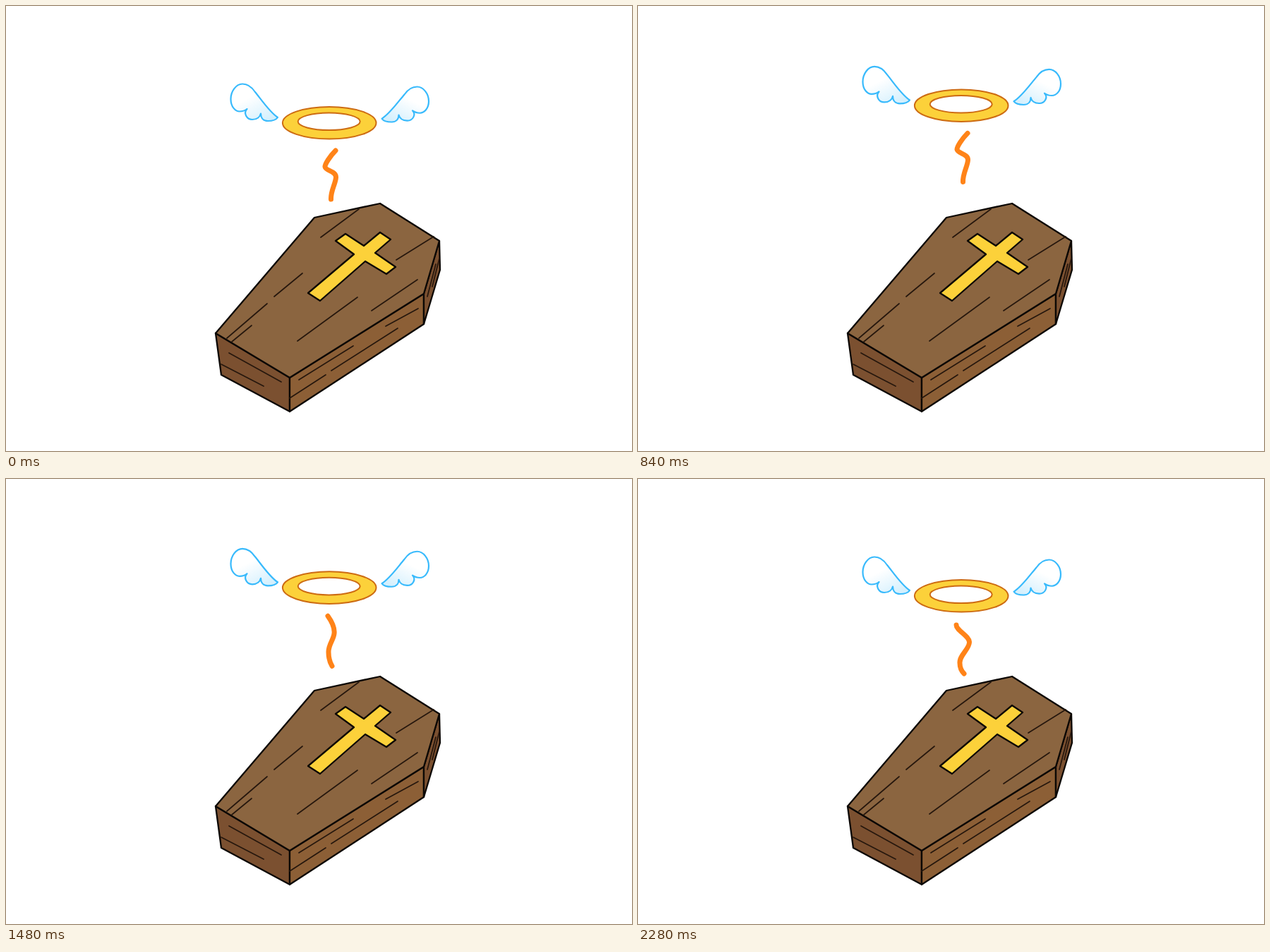
Recreate the animation shown at these times as an HTML page. Size 887 by 631 pixels, loop 2.36 s.

```html
<!DOCTYPE html>
<html lang="en">
<head>
<meta charset="utf-8">
<title>Coffin and halo</title>
<style>
  html, body { margin: 0; width: 100%; height: 100%; overflow: hidden; background: #fff; }
  svg { display: block; width: 887px; height: 631px; }
  path, ellipse { stroke-linejoin: round; stroke-linecap: round; }
  .box { stroke: #0c0805; stroke-width: 2.3; }
  .grain { fill: none; stroke: #26170d; stroke-width: 1.7; }
  .wing { fill: url(#feather); stroke: #38bafc; stroke-width: 2.2; }
  .ring { stroke: #cd6b12; stroke-width: 2; }
  #smoke { fill: none; stroke: #ff8318; stroke-width: 7; }
</style>
</head>
<body>
<svg viewBox="0 0 887 631">
  <defs>
    <linearGradient id="feather" x1=".35" y1=".3" x2=".8" y2="1">
      <stop offset=".1" stop-color="#fff"/>
      <stop offset="1" stop-color="#d2effd"/>
    </linearGradient>
    <path id="wing" d="M385 158C374 151 362 133 353 122C347 113 341 110.500 335 110.500C326 110.500 318.500 121 318.500 132C318.500 143 325 149.500 331 149.500C336 149.500 339 148 341.500 146C336 152 341 161 349 161C356 161 360 157 361 152.500C361 159 365 163 371 163C378 163 383 161 385 158Z"/>
  </defs>

  <g class="box">
    <path fill="#7b5030" d="M297 464L402 527V575L305 523Z"/>
    <path fill="#8c5f36" d="M402 527L592 408V451L402 575Z"/>
    <path fill="#7b5030" d="M614 333L615 374L592 451V408Z"/>
    <path fill="#8b6540" d="M297 464L437 300L530 280L614 333L592 408L402 527Z"/>
  </g>
  <path class="grain" d="M446 328L500 288M553 360L606 327M380 412L420 379M413 475L498 413M518 432L583 388M313 471L370 422M320 476L348 453
    M415 530L492 482M402 556L453 523M461 517L555 457M538 454L584 429
    M316 492L390 533M305 508L365 539M597 412L609 366M604 398L614 358"/>
  <path class="box" fill="#fcd13a" d="M428 407L493 352L467 333L481 323L507 340L530 321L545 331L523 350L552 370L539 380L509 362L445 418Z"/>

  <g id="soul">
    <use href="#wing" class="wing"/>
    <use href="#wing" class="wing" transform="matrix(-1 0 0 .953 917.5 9.2)"/>
    <ellipse class="ring" fill="#fcd13a" cx="458.200" cy="165.800" rx="66.300" ry="22.800"/>
    <ellipse class="ring" fill="#fff" cx="457.700" cy="163.800" rx="44" ry="12.300"/>
    <path id="smoke"/>
  </g>
</svg>
<script>
const LOOP = 2360, STEP = 40, PEAK = 1000, LANDED = 1800, RISE = 29.3;
const soul = document.getElementById('soul');
const smoke = document.getElementById('smoke');

const left = 'M467 205C459 213 452 224 452 228C453 234 468 234 467.5 243C467 252 460 262 460.5 274';
const midLeft = 'M466.5 204C458 212 457 223 460 230C466 238 460 248 460 260C460 268 460 272 462 276.5';
const midRight = 'M456 206C461 213 466 223 465 231C464 240 457 246 457 257C457 265 459 272 462 277';
const right = 'M451 207C451 215 469 222 469.5 231C470 241 455 250 456 261C456 267 458 272 462 276';

// The smoke sways left to right and back, holding longest at the ends.
const sway = [left, midLeft, midRight, right, midRight, midLeft];
const swayTimes = [0, 120, 240, 360, 600, 720, 840, 1080, 1200, 1360, 1480, 1600, 1840, 2040, 2160, 2280];

function height(t) {
  if (t < PEAK) return RISE * t / PEAK;
  return RISE * Math.max(0, (LANDED - t) / (LANDED - PEAK));
}

function draw(now) {
  const t = Math.floor(now % LOOP / STEP) * STEP;
  const pose = swayTimes.filter(start => start <= t).length - 1;
  soul.setAttribute('transform', `translate(0 ${-height(t)})`);
  smoke.setAttribute('d', sway[pose % sway.length]);
}

const start = performance.now();
function tick() {
  draw(performance.now() - start);
  requestAnimationFrame(tick);
}
tick();
</script>
</body>
</html>
```
